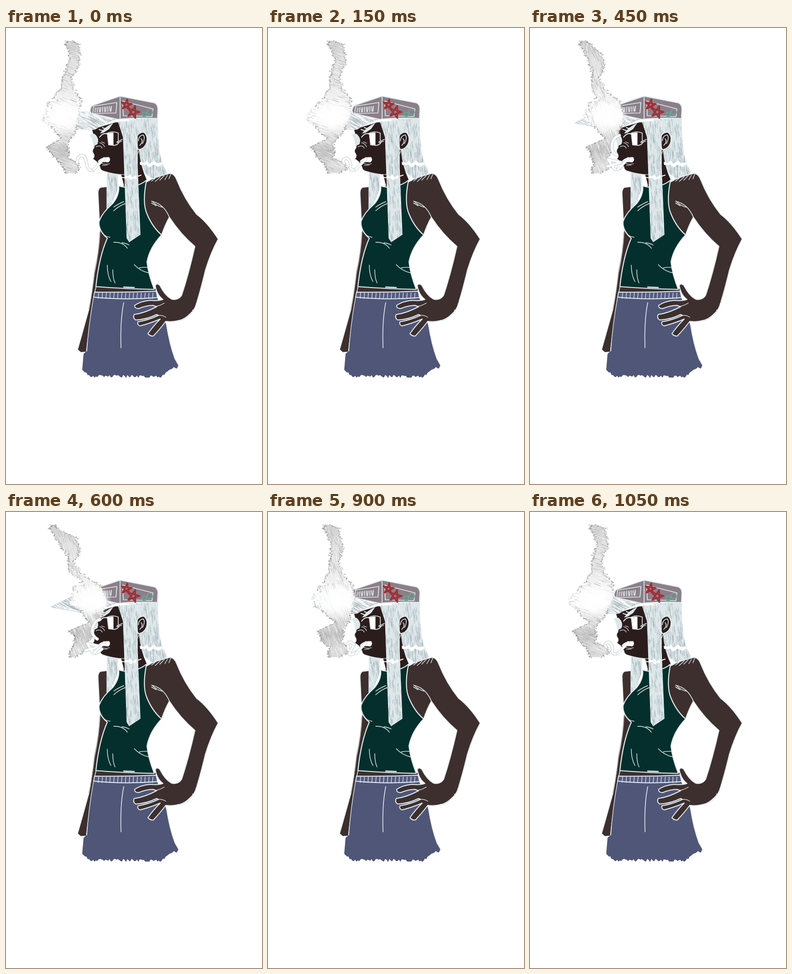
Recreate the animation shown at these times as an HTML page with a canvas. Size 561 by 998 pixels, loop 1.2 s.

```html
<!DOCTYPE html>
<html lang="en">
<head>
<meta charset="utf-8">
<title>Smoke</title>
<style>
html, body { margin: 0; width: 100%; height: 100%; overflow: hidden; background: #fff; }
canvas { display: block; width: 100%; height: 100%; }
</style>
</head>
<body>
<canvas id="stage" width="561" height="998"></canvas>
<script>
const stage = document.getElementById('stage');
const figure = document.createElement('canvas');
figure.width = 561;
figure.height = 998;
let ctx = figure.getContext('2d');

const SKIN = '#3d2f2e', FACE = '#2c1d1d', LINE = '#e4eeef', HAIR = '#dde7ea';

function seeded(seed) {
  return () => (seed = (seed * 16807) % 2147483647) / 2147483647;
}

function line(d, width = 1.5, color = LINE) {
  ctx.strokeStyle = color;
  ctx.lineWidth = width;
  ctx.stroke(new Path2D(d));
}

function shape(d, fill, width = 2, color = LINE) {
  ctx.fillStyle = fill;
  ctx.fill(new Path2D(d));
  if (width) line(d, width, color);
}

// Short parallel strokes scattered over a box and clipped to a path.
function hatch(path, [x, y, w, h], [dx, dy], count, color, seed) {
  const rnd = seeded(seed);
  ctx.save();
  ctx.clip(path);
  ctx.strokeStyle = color;
  ctx.lineWidth = 0.7;
  ctx.beginPath();
  for (let i = 0; i < count; i++) {
    const px = x + rnd() * w, py = y + rnd() * h, len = 0.5 + rnd();
    ctx.moveTo(px, py);
    ctx.lineTo(px + dx * len, py + dy * len);
  }
  ctx.stroke();
  ctx.restore();
}

function hair(d, box, count, seed) {
  shape(d, HAIR, 1.2, '#edf4f6');
  hatch(new Path2D(d), box, [1, 13], count, '#9facb2', seed);
}

function star(cx, cy, r, turn) {
  let d = '';
  for (let i = 0; i < 6; i++) {
    const a = turn + i * Math.PI * 0.8;
    d += (i ? 'L' : 'M') + (cx + r * Math.sin(a)) + ' ' + (cy - r * Math.cos(a));
  }
  line(d, 3.2, '#a52c31');
}

function drawBody() {
  // Far arm
  shape('M224 347L207 349Q201 353 202 364L206 445Q204 490 194 535Q188 585 182 615L165 676L157 704L164 710L176 709Q180 670 188 625L205 520L225 450Z', SKIN, 1.4);
  line('M205 447Q204 490 194 530Q188 590 181 615', 1, '#9ba3a5');

  // Hair behind the head and neck
  hair('M270 200L333 197Q332 245 338 278Q342 300 354 317L329 331Q304 326 296 300L289 262Z', [270, 196, 84, 134], 260, 7);
  hair('M221 314L245 317L246 347Q238 375 221 403Z', [218, 310, 30, 90], 60, 13);
  shape('M250 312L292 268Q295 303 309 333L320 390L300 410L244 365L258 345Z', FACE, 1);
  line('M251 327Q275 330 296 322', 2, '#fff');

  // Near shoulder, arm and chest
  shape('M303 338Q332 324 360 318Q370 320 374 332Q391 375 418 408Q442 426 465 462Q449 491 437 530Q425 580 415 610Q405 632 384 640L354 643L360 600Q378 599 384 588Q400 540 414 478Q382 451 358 414Q348 432 341 453Q313 430 302 390Z', SKIN, 2);
  line('M319 379Q346 385 358 414M319 383L329 389M320 379Q331 390 342 392', 1.6);
  line('M308 337L316 333M319 335L327 329M327 336L338 326M337 333L347 323M348 332L354 322M357 330L361 320', 1.4);
}

function drawClothes() {
  shape('M198 564L328 570L330 579L194 580Z', SKIN, 1.5);
  const top = 'M247 345Q256 350 266 347L288 344Q298 341 308 333Q298 382 309 407Q321 436 341 453Q315 480 309 512Q312 540 325 572Q260 571 197 566Q204 500 222 460Q202 443 204 423Q211 404 233 385Q249 366 247 345Z';
  shape(top, '#042f2c', 2.2);
  line('M236 400Q248 389 262 384M236 392Q248 384 258 380M228 458Q215 456 209 446M236 469Q256 468 266 482M254 470Q263 471 270 475M222 519Q222 541 230 555M234 529Q234 548 239 558M281 518Q294 532 313 536M292 525Q305 523 312 524', 1.4);
  line('M258 567L281 568', 2.5);

  // Skirt with a frayed hem
  const rnd = seeded(41);
  let hem = '';
  for (let x = 374; x > 170; x -= 3) {
    const base = 766 - 22 * Math.max(0, (x - 340) / 36) - 10 * Math.max(0, (190 - x) / 24);
    hem += `L${x} ${base - rnd() * 7}`;
  }
  const skirt = 'M192 588L331 589Q344 622 351 650Q358 692 370 724L378 738L374 746' + hem + 'L167 748L170 713L177 707Q181 650 192 588Z';
  shape(skirt, '#505678', 0);
  line('M192 588Q181 650 177 707M352 650Q358 692 370 724L378 738', 1.4);
  line('M258 601Q250 640 252 700', 1.6);
  shape('M194 578Q262 579 329 576L332 590Q260 596 192 589Z', '#555b82', 1.8);
  let ribs = '';
  for (let x = 203; x < 328; x += 8.5) ribs += `M${x} 580L${x - 1} 592`;
  line(ribs, 1.3);

  // Hand on the hip
  shape('M385 588Q372 597 362 593Q348 585 337 563Q330 557 327 564Q331 585 344 594Q333 598 316 596Q295 598 282 607Q281 614 291 614Q308 607 322 607L330 610Q304 624 281 627Q277 634 284 639Q308 638 330 627L334 629Q313 639 289 643Q287 650 294 652Q314 647 338 637Q322 653 311 669Q316 675 323 674Q339 657 350 642Q385 647 410 619Z', SKIN, 2);
  shape('M356 594Q378 602 389 580L418 598Q405 632 380 639L354 638Z', SKIN, 0);
  line('M334 629Q343 628 350 633M330 609Q339 607 347 602', 1.4);
}

function drawHead() {
  shape('M188 222Q212 214 240 206L288 206L292 267Q276 308 258 321Q235 320 217 314Q206 312 206 304L199 293L190 286Q196 282 192 275Q187 269 193 262Q196 246 188 222Z', FACE, 1.2);
  shape('M282 249Q287 228 302 228Q312 236 308 251Q303 265 290 266Z', FACE, 2);
  line('M290 247Q291 235 301 234Q306 241 299 253M293 257Q302 248 296 242', 1.5);

  // Brows, eye, cheeks and mouth
  shape('M184 233L194 232Q205 242 200 254L192 258L189 244Z', HAIR, 1);
  shape('M206 231Q216 216 235 208L226 221L214 229Z', HAIR, 0);
  line('M205 239Q213 228 222 232M204 222L215 226M211 218L222 222', 2);
  shape('M222 231L235 229L235 257L225 256Z', '#fff', 1, '#fff');
  line('M220 231Q233 224 246 230L246 246M235 257Q244 257 248 250M243 249L255 244M243 251L253 248', 1.6);
  line('M197 260Q207 255 211 263M205 251Q213 253 216 260M209 249L216 252', 1.2);
  shape('M202 291Q210 282 226 283Q230 290 224 294Q214 291 203 296Z', '#fff', 1);
  line('M209 296Q217 300 227 297M211 301L222 300', 1.2);

  // Front strand and the shine bands
  hair('M246 205L288 203L288 305L294 452L270 468L265 460L257 239Z', [244, 200, 52, 265], 270, 19);
  shape('M261 323L267 325L273 321L277 327L286 322L285 330L278 329L274 334L268 328L261 329Z', '#fff', 0);
  shape('M293 293L302 295L309 291L314 297L325 290L331 296L341 294L343 298L334 304L323 299L315 305L308 299L294 300Z', '#fff', 0);
}

function drawCap() {
  const brim = 'M98 208L148 183L187 184L245 199Q222 204 195 222Q177 224 153 218Z';
  shape(brim, '#f2f6f7', 1.2, '#cdd8db');
  hatch(new Path2D(brim), [95, 180, 145, 40], [18, 10], 130, '#97a3a8', 31);
  shape('M184 182Q185 171 191 169L250 149L326 164Q333 168 333 177L332 198Q280 196 245 200L187 187Z', '#8b7f89', 2.2);
  line('M250 149L250 199M192 171L243 163L241 186L190 187ZM256 160L322 177L320 194L257 192Z', 1.7);
  let marks = '';
  for (let i = 0; i < 10; i++) {
    const x = 196 + i * 3.9;
    marks += `M${x} ${175 - i * 0.4}L${x + (i % 3) - 1} ${184 - i * 0.2}`;
  }
  line(marks, 1.8);
  star(264, 168, 12, 0.15);
  star(279, 184, 14, 0.3);
  line('M298.5 189a4.5 5 0 1 0 9 0a4.5 5 0 1 0 -9 0M309 184a6 6 0 1 0 12 0a6 6 0 1 0 -12 0', 2.2, '#62ad98');
}

// Left and right edge of the plume at each height, one row per pose.
const heights = [28, 36, 55, 75, 92, 108, 130, 150, 165, 185, 200, 212, 228, 242, 260, 272, 284, 296, 308, 320];
const plumes = [
  '133 146 130 160 139 162 136 160 130 154 122 142 122 146 104 160 92 163 86 158 78 156 94 154 108 152 118 140 90 134 94 137 108 136 118 158 126 160 132 148',
  '133 144 131 165 142 168 146 171 138 160 134 156 136 160 122 178 110 180 88 180 84 178 100 170 112 164 128 150 94 142 100 145 108 142 122 168 127 174 133 150',
  '124 136 121 156 132 158 138 164 136 160 133 154 134 160 122 176 112 186 96 188 100 186 112 184 130 180 145 176 110 164 112 164 118 160 135 174 130 176 134 150',
  '112 122 108 134 120 156 128 162 134 160 134 150 136 160 144 182 130 198 120 202 116 204 136 200 150 196 162 186 124 176 130 176 134 170 140 178 134 172 137 148'
].map(row => row.split(' ').map(Number));
plumes.push(plumes[3].map((x, i) => 2 * x - plumes[2][i]));

const curls = [
  'M191 311Q180 315 177 297Q173 275 163 280Q155 284 156 295',
  'M191 310Q178 314 181 298Q177 282 168 286Q162 290 167 296',
  'M194 306Q180 316 178 309L189 290Q178 281 175 288L176 302',
  'M202 303Q186 316 182 304L171 288L199 294Q186 299 169 303M190 278Q176 270 180 253Q184 238 196 235',
  'M210 300Q193 316 188 304L178 288L207 294Q192 299 174 303M200 278Q186 270 190 253Q194 238 206 235'
];

function plumeOutline(edges) {
  const rnd = seeded(97);
  const sides = [[], []];
  for (let i = 0; i < heights.length - 1; i++) {
    for (let k = 0; k < 6; k++) {
      const u = k / 6, y = heights[i] + (heights[i + 1] - heights[i]) * u;
      sides.forEach((side, s) => {
        const x = edges[2 * i + s] * (1 - u) + edges[2 * i + 2 + s] * u;
        const spike = s === 0 && y > 155 && y < 210 && k === 3 ? 11 : 0;
        side.push([x + (rnd() - 0.5) * 5 + spike, y + (rnd() - 0.5) * 2]);
      });
    }
  }
  return [...sides[0], ...sides[1].reverse()];
}

function drawSmoke(pose) {
  const edges = plumes[pose], points = plumeOutline(edges);
  const path = new Path2D('M' + points.map(p => p.join(' ')).join('L') + 'Z');
  const tone = ctx.createLinearGradient(0, 28, 0, 322);
  [[0, '#c9c9c9'], [0.15, '#dcdcdc'], [0.3, '#dedede'], [0.46, '#f4f4f4'], [0.6, '#fff'],
   [0.7, '#dfdfdf'], [0.82, '#bcbcbc'], [0.93, '#dadada'], [1, '#cfcfcf']]
    .forEach(([at, color]) => tone.addColorStop(at, color));
  ctx.globalAlpha = 0.88;
  ctx.fillStyle = tone;
  ctx.fill(path);
  ctx.globalAlpha = 1;
  const slant = pose < 2 ? [10, 4] : [4, 11];
  hatch(path, [70, 28, 155, 295], slant, 650, 'rgba(255,255,255,.85)', 53);
  hatch(path, [70, 28, 155, 295], slant, 420, 'rgba(125,125,125,.45)', 59);

  // Bright haze where the plume crosses the brim
  const cx = (edges[20] + edges[21]) / 2 + 10;
  const glow = ctx.createRadialGradient(cx, 192, 4, cx, 192, 44);
  glow.addColorStop(0, 'rgba(255,255,255,1)');
  glow.addColorStop(0.55, 'rgba(255,255,255,.85)');
  glow.addColorStop(1, 'rgba(255,255,255,0)');
  ctx.save();
  ctx.translate(0, 192);
  ctx.scale(1, 0.8);
  ctx.translate(0, -192);
  ctx.fillStyle = glow;
  ctx.fillRect(cx - 46, 145, 92, 94);
  ctx.restore();

  // Broken, gritty rim
  const rnd = seeded(71);
  points.forEach(([x, y]) => {
    const bright = y > 175 && y < 215;
    ctx.fillStyle = bright ? '#c4cacc' : '#858585';
    for (let i = 0; i < 3; i++) {
      ctx.fillRect(x + (rnd() - 0.5) * 4, y + (rnd() - 0.5) * 3, 1 + rnd(), 1);
    }
  });

  line(curls[pose], 7, '#c3c9cb');
  line(curls[pose], 5, '#fafcfc');
  line('M192 310L215 286', 6.5, '#ccd4d6');
  line('M192 310L215 286', 4.5, '#fff');
}

ctx.lineJoin = ctx.lineCap = 'round';
drawBody();
drawClothes();
drawHead();
drawCap();

ctx = stage.getContext('2d');
ctx.lineJoin = ctx.lineCap = 'round';
const start = performance.now();
let shown = -1;

function frame() {
  const step = Math.floor(((performance.now() - start) % 1200) / 150);
  const pose = Math.min(step, 8 - step);
  if (pose !== shown) {
    shown = pose;
    ctx.fillStyle = '#fff';
    ctx.fillRect(0, 0, 561, 998);
    ctx.drawImage(figure, 0, 0);
    drawSmoke(pose);
  }
  requestAnimationFrame(frame);
}
frame();
</script>
</body>
</html>
```
